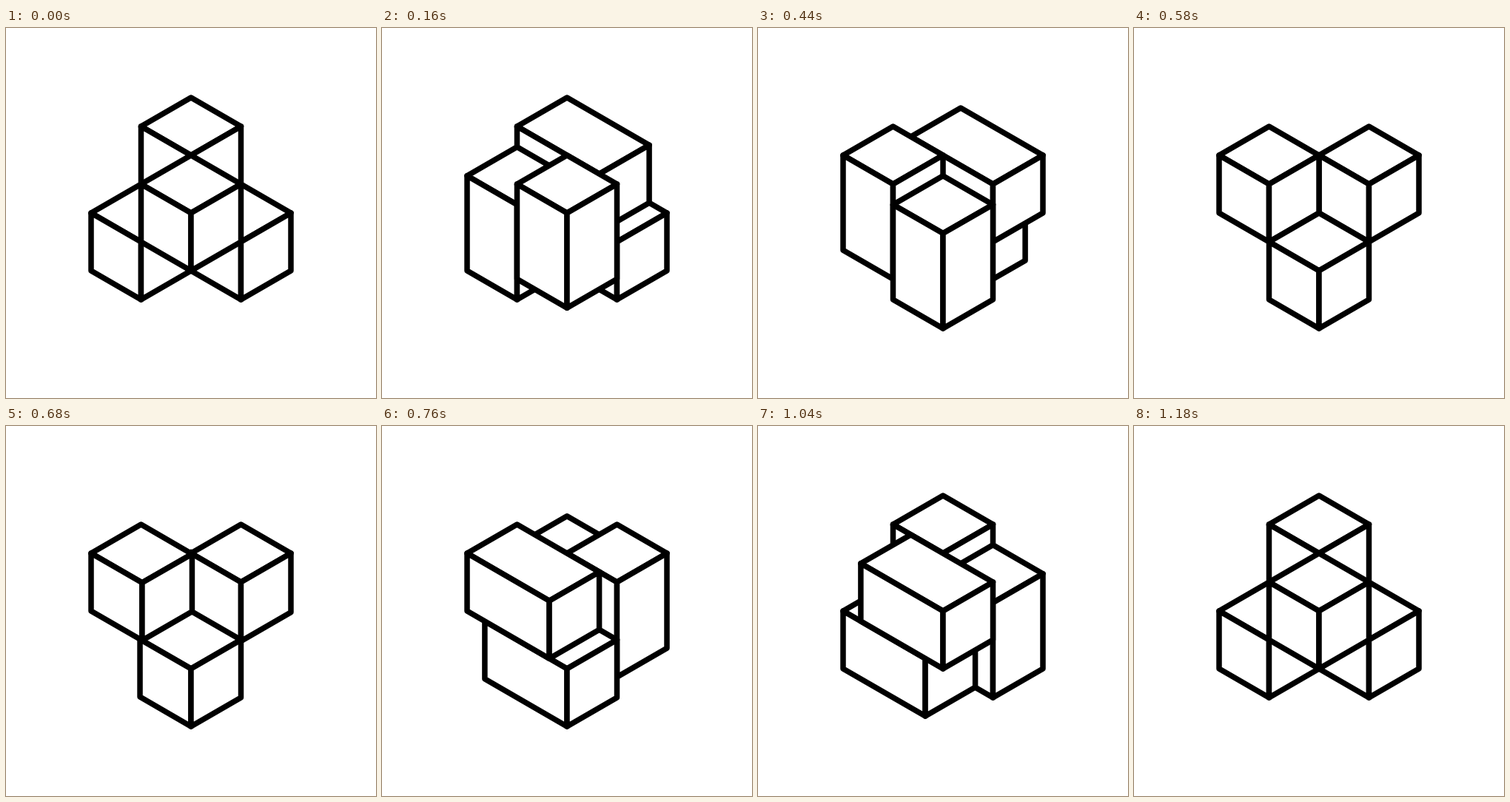
Recreate the animation shown at these times as an HTML page without scripts. Size 500x500 px, loop 1200 ms.

```html
<!DOCTYPE html>
<html lang="en">
<head>
<meta charset="utf-8">
<title>Sliding boxes</title>
<style>
  @property --t {
    syntax: "<number>";
    inherits: true;
    initial-value: 0;
  }
  @keyframes run { from { --t: 0 } to { --t: 4 } }

  html, body { margin: 0; width: 100%; height: 100%; overflow: hidden; background: #fff }

  svg {
    display: block;
    width: 100vw;
    height: 100vh;
    animation: run 1200ms steps(60) -1ms infinite;

    /* Quintic ease in-out: each stretch is a lead, then a trail */
    --lead1: calc(.5 + 16 * (pow(clamp(0, var(--t), .5), 5) - pow(clamp(0, 1 - var(--t), .5), 5)));
    --trail1: calc(.5 + 16 * (pow(clamp(0, var(--t) - 1, .5), 5) - pow(clamp(0, 2 - var(--t), .5), 5)));
    --lead2: calc(.5 + 16 * (pow(clamp(0, var(--t) - 2, .5), 5) - pow(clamp(0, 3 - var(--t), .5), 5)));
    --trail2: calc(.5 + 16 * (pow(clamp(0, var(--t) - 3, .5), 5) - pow(clamp(0, 4 - var(--t), .5), 5)));
    --size1: calc(1 + var(--lead1) - var(--trail1));
    --size2: calc(1 + var(--lead2) - var(--trail2));
    --late: clamp(0, (var(--t) - 1.99) * 1000, 1);

    /* Isometric unit on screen */
    --u: 67.5;
    --v: 38.97;
  }

  /* x runs right and down, y left and down, z straight down */
  .box {
    transform: translate(
      calc(250px + 1px * var(--u) * (var(--x) - var(--y))),
      calc(94.12px + 1px * var(--v) * (var(--x) + var(--y) + 2 * var(--z))));
    --xu: calc(var(--u) * var(--dx));
    --xv: calc(var(--v) * var(--dx));
    --zv: calc(2 * var(--v) * var(--dz));
  }
  .back   { --x: calc(1 - var(--lead1)); --dx: var(--size1); --y: 0; --z: calc(1 - var(--lead2)); --dz: var(--size2) }
  .right  { --x: var(--trail1); --dx: var(--size1); --y: 0; --z: var(--trail2); --dz: var(--size2) }
  .left   { --x: var(--trail2); --dx: var(--size2); --y: 1; --z: calc(1 - var(--lead1)); --dz: var(--size1) }
  .front  { --x: calc(1 - var(--lead2)); --dx: var(--size2); --y: 1; --z: var(--trail1); --dz: var(--size1) }

  /* The left box passes in front halfway through */
  .under { opacity: calc(1 - var(--late)) }
  .over  { opacity: var(--late) }

  rect {
    fill: #fff;
    stroke: #000;
    stroke-width: 7.5px;
    stroke-linejoin: round;
    vector-effect: non-scaling-stroke;
  }
  .top   { transform: matrix(var(--xu), var(--xv), calc(-1 * var(--u)), var(--v), 0, 0) }
  .sideY { transform: matrix(var(--xu), var(--xv), 0, var(--zv), calc(-1 * var(--u)), var(--v)) }
  .sideX { transform: matrix(calc(-1 * var(--u)), var(--v), 0, var(--zv), var(--xu), var(--xv)) }
</style>
</head>
<body>
<svg viewBox="0 0 500 500">
  <defs>
    <g id="faces">
      <rect class="top" width="1" height="1"/>
      <rect class="sideY" width="1" height="1"/>
      <rect class="sideX" width="1" height="1"/>
    </g>
  </defs>
  <use class="box back" href="#faces"/>
  <use class="box right" href="#faces"/>
  <use class="box left under" href="#faces"/>
  <use class="box front" href="#faces"/>
  <use class="box left over" href="#faces"/>
</svg>
</body>
</html>
```
